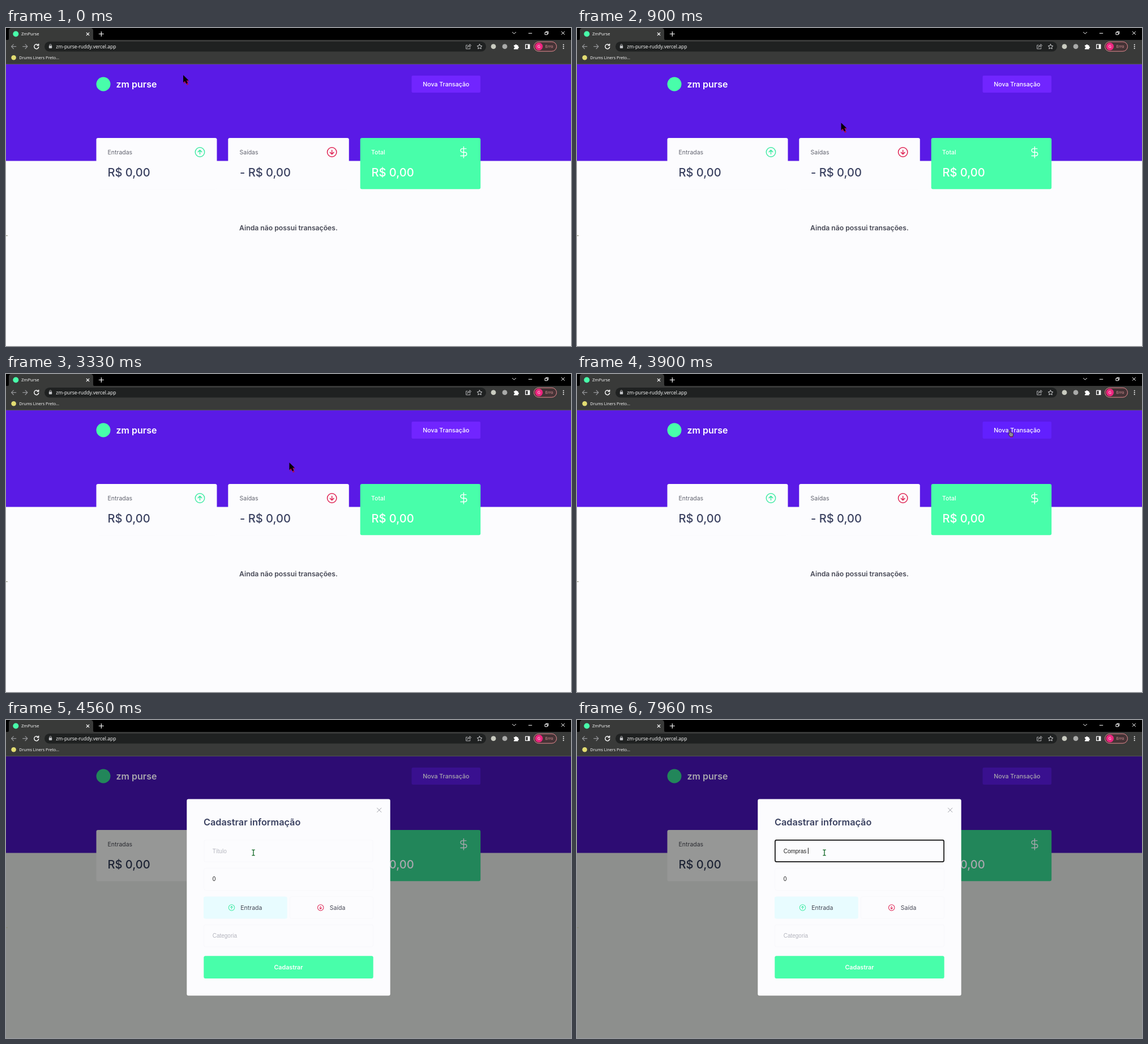
Animation, 998 px wide and 561 px high, one loop 8000 ms. Source, as an HTML page:

```html
<!DOCTYPE html>
<html lang="pt-BR">
<head>
<meta charset="utf-8">
<title>Nova Transação</title>
<style>
  html, body { margin: 0; width: 100%; height: 100%; overflow: hidden; background: #fcfcfe; }
  svg { display: block; width: 100%; height: 100%; }
  text { font-family: Inter, sans-serif; font-size: 10.5px; white-space: pre; }
  .ui text { font-family: "Open Sans", sans-serif; font-weight: 500; fill: #fff; }
  .input { font-family: "Liberation Sans", Arial, sans-serif; font-size: 10px; fill: #222; }
  .hint { fill: #b4b5be; }
  .line { fill: none; stroke-linecap: round; stroke-linejoin: round; }
  .field { fill: #fcfcfe; stroke: #f8f8fb; }
  .focus { fill: #fcfcfe; stroke: #111; stroke-width: 1.7; }
  .medium { font-weight: 500; }
  .bold { font-weight: 600; }
  .heading { font-size: 16.3px; fill: #3a4160; }
  .option { fill: #464855; }
  .white { fill: #fff; }

  /* page colours, plain and behind the dialog */
  #page {
    --back: #fcfcfe; --card: #fcfcfe; --purple: #5a1ae6; --green: #48feaa;
    --button: #7125ff; --hover: #6220fe; --light: #fff; --label: #62646f; --dark: #3a4160;
  }
  #page.dim {
    --back: #8d8f8d; --card: #969796; --purple: #2d0c73; --green: #22865a;
    --button: #39108f; --hover: #340f8a; --light: #a9a7ae; --label: #2b2c32; --dark: #1d2334;
  }
  .back { fill: var(--back); }
  .card { fill: var(--card); }
  .purple { fill: var(--purple); }
  .green { fill: var(--green); }
  .button { fill: var(--button); }
  .button.hover { fill: var(--hover); }
  .light { fill: var(--light); }
  .label { fill: var(--label); }
  .amount { font-size: 20.1px; font-weight: 500; fill: var(--dark); }
  .amount.light { fill: var(--light); }
</style>
</head>
<body>
<svg viewBox="0 0 998 561">
  <defs>
    <g id="up" class="line"><circle r="8.2"/><path d="M0 3.6V-3.6M-3.3-.4 0-3.7 3.3-.4"/></g>
    <g id="down" class="line"><circle r="8.2"/><path d="M0-3.6V3.6M-3.3 .4 0 3.7 3.3 .4"/></g>
  </defs>

  <g id="page">
    <rect class="back" width="998" height="561"/>
    <rect class="purple" y="64" width="998" height="170.5"/>
    <circle class="green" cx="172" cy="99" r="12.5"/>
    <text x="194.5" y="104.5" class="bold light" style="font-size:16px">zm purse</text>
    <rect id="newButton" class="button" x="716.5" y="84" width="121.5" height="30" rx="2"/>
    <text x="777.3" y="103" text-anchor="middle" class="medium light" style="font-size:10.6px">Nova Transação</text>

    <rect class="card" x="159.5" y="194" width="213" height="90.5" rx="3"/>
    <rect class="card" x="392.3" y="194" width="213.5" height="90.5" rx="3"/>
    <rect class="green" x="625.7" y="194" width="212.5" height="90.3" rx="3"/>
    <text x="179.5" y="223" class="label">Entradas</text>
    <text x="412.5" y="223" class="label">Saídas</text>
    <text x="645" y="223" class="medium light">Total</text>
    <text x="179.5" y="261.5" class="amount">R$ 0,00</text>
    <text x="413" y="261.5" class="amount">- R$ 0,00</text>
    <text x="645.5" y="261.5" class="amount light">R$ 0,00</text>
    <use href="#up" x="342.5" y="219" stroke="#42eba5" stroke-width="1.5"/>
    <use href="#down" x="575.7" y="219" stroke="#df2454" stroke-width="1.5"/>
    <path class="line" transform="translate(797.6 208.4) scale(.9)" stroke="var(--light)" stroke-width="1.5"
      d="M12 1v22M17 5H9.5a3.5 3.5 0 0 0 0 7h5a3.5 3.5 0 0 1 0 7H6"/>
    <text x="499" y="357.3" text-anchor="middle" class="bold option" style="font-size:12.2px">Ainda não possui transações.</text>
    <path d="M0 366.3h3" stroke="#85866c"/>
  </g>

  <g id="modal">
    <rect x="319.3" y="139.4" width="359.4" height="346.9" rx="3" fill="#fcfcfe"/>
    <path id="close" class="line" d="M655.5 155.2l7.4 7.4m0-7.4l-7.4 7.4" stroke="#a0a1aa"/>
    <text x="349" y="186" class="bold heading">Cadastrar informação</text>
    <rect id="titleField" x="349.9" y="211.9" width="298.2" height="38.2" rx="2.5"/>
    <text id="titleText" x="364.7" y="234.5" class="input"></text>
    <path id="caret" d="M0 225.5v10.5" stroke="#111"/>
    <rect class="field" x="349.5" y="261.5" width="299" height="39" rx="3"/>
    <text x="364.7" y="284.4" class="input">0</text>
    <rect x="349" y="311.5" width="147.7" height="39" rx="3" fill="#e8fcff"/>
    <rect class="field" x="501.5" y="311.5" width="147" height="39" rx="3"/>
    <use href="#up" transform="translate(398.5 331) scale(.64)" stroke="#42eba5" stroke-width="1.6"/>
    <use href="#down" transform="translate(555.7 331) scale(.64)" stroke="#df2454" stroke-width="1.6"/>
    <text x="414.3" y="334.8" class="option">Entrada</text>
    <text x="571.8" y="334.8" class="option">Saída</text>
    <rect class="field" x="349.5" y="361" width="299" height="39" rx="3"/>
    <text x="364.7" y="384.3" class="input hint">Categoria</text>
    <rect x="349.3" y="416.3" width="299.4" height="39.6" rx="3" fill="#48feaa"/>
    <text x="499" y="440" text-anchor="middle" class="bold white" style="font-size:10.7px">Cadastrar</text>
  </g>

  <g class="ui">
    <rect width="998" height="22" fill="#000"/>
    <rect y="21" width="998" height="43" fill="#393a39"/>
    <path d="M1 22q4 0 4-4V5q0-5 5-5H149q5 0 5 5V18q0 4 4 4z" fill="#393a39"/>
    <path d="M0 63.7H998" stroke="#5c5d5c" stroke-width=".8"/>
    <circle cx="17.3" cy="10.5" r="5" fill="#48feaa"/>
    <text x="27" y="13.3" style="font-size:7.6px">ZmPurse</text>
    <rect x="68" y="24" width="780" height="17.5" rx="8.7" fill="#1f2121"/>
    <g class="line" stroke="#fff" stroke-width="1.2">
      <path d="M142.2 8.3l4.6 4.6m0-4.6l-4.6 4.6M164.3 10.5h8m-4-4v8"/>
      <path d="M894.5 7.3l3 3 3-3M923.2 9.3h5.6M981.2 6.2l5.3 5.3m0-5.3l-5.3 5.3" stroke-width="1"/>
      <path d="M952.3 7.7h4v4h-4zM953.8 7.5V6.2h4v4h-1.3" stroke-width="1"/>
      <path d="M17.7 32.7H9.7m3.6-3.8l-3.8 3.8 3.8 3.8M29.7 32.7h8m-3.6-3.8l3.8 3.8-3.8 3.8" stroke="#96979a"/>
      <path d="M57 30.3a4 4 0 1 0 .7 3.2M57.7 28.2v2.7H55" stroke-width="1.4"/>
      <path d="M76.9 31.5v-1.2a1.6 1.6 0 0 1 3.2 0v1.2" stroke="#c4c5c8" stroke-width=".9"/>
      <path d="M815 30.2h-2.3v6.6h7v-2M815.2 34q.3-3.7 4-3.7v-1.8l2.4 2.5-2.4 2.4v-1.6q-2.5-.1-4 2.2z" stroke="#c4c5c8" stroke-width=".9"/>
      <path d="M836.5 28.6l1.3 2.7 3 .4-2.2 2.1.6 3-2.7-1.5-2.7 1.5.6-3-2.2-2.1 3-.4z" stroke="#e4e5e8" stroke-width=".9"/>
      <path d="M917.6 29.2h7.2v7.2h-7.2z"/>
    </g>
    <rect x="75.8" y="31.3" width="5.4" height="4.4" rx=".7" fill="#c4c5c8"/>
    <text x="88.3" y="35.8" style="font-size:8.5px">zm-purse-ruddy.vercel.app</text>
    <circle cx="861" cy="32.7" r="4.4" fill="#c9cbc0"/>
    <circle cx="881" cy="32.7" r="4.4" fill="#a9aaa9"/>
    <path d="M897 30.2h2.2a1.5 1.5 0 0 1 3 0h2.3v2.4a1.5 1.5 0 0 1 0 3v2h-7.5v-2.2a1.5 1.5 0 0 0 0-3z" fill="#fff"/>
    <path d="M921.7 29.2h3.3v7.3h-3.3z" fill="#fff"/>
    <rect x="932.5" y="24.3" width="40" height="16.8" rx="8.4" fill="#453336" stroke="#e98b92"/>
    <circle cx="941.3" cy="32.6" r="6.8" fill="#ec267f"/>
    <text x="941.3" y="35.2" text-anchor="middle" style="font-size:7px">G</text>
    <text x="952.8" y="35.3" style="font-size:7px;fill:#f0a0a4">Erro</text>
    <g fill="#fff"><circle cx="984.7" cy="29.5" r="1"/><circle cx="984.7" cy="32.8" r="1"/><circle cx="984.7" cy="36.1" r="1"/></g>
    <circle cx="13.6" cy="52.3" r="4.3" fill="#e2dc72"/>
    <text x="23.3" y="55" style="font-size:7.2px">Drums Liners Preto...</text>
  </g>

  <g id="arrow">
    <path d="M1 2v13.5l3-2.6 2.5 5 3-1.4-2.3-4.8h3.4z" fill="#a80c58"/>
    <path d="M0 0v13l3-2.6 2.3 4.8 2.6-1.2-2.2-4.6h4z" fill="#080008"/>
  </g>
  <g id="hand">
    <path d="M2.5 0q1.2 0 1.2 1.2v3l4 1q1.2.3 1 1.8l-.8 4.5H2.8L0 7.3q0-1.3 1.3-.7V1.2Q1.3 0 2.5 0z" fill="#8f8c91" stroke="#25122f" stroke-width=".8"/>
    <path d="M2.8 12.3h5" stroke="#c01070"/>
  </g>
  <path id="beam" class="line" d="M-2.2-4.8h1.5l.7.7.7-.7h1.5M0-4v8M-2.2 4.8h1.5l.7-.7.7.7h1.5" stroke="#0b6420" stroke-width="1.3"/>
</svg>
<script>
const LOOP = 8000, OPEN = 3930, FOCUS = 4600;
const el = id => document.getElementById(id);

// [time, x, y] of the pointer tip
const pointerPath = [
  [30, 313, 83], [360, 490, 141], [620, 524, 168], [830, 470, 168], [1030, 458, 165],
  [3200, 458, 165], [3760, 764, 101], [3900, 762, 99], [3930, 757, 98],
  [4030, 757, 98], [4560, 437, 234]
];

// the title with its mistyped letters
const typing = [
  [5830, 'C'], [5960, 'Co'], [6130, 'Com'], [6300, 'Comp'], [6430, 'Compa'], [6600, 'Compas'],
  [6960, 'Compa'], [7100, 'Comp'], [7300, 'Compr'], [7660, 'Compra'], [7730, 'Compras'], [7930, 'Compras ']
];

function pointerAt(t) {
  const next = pointerPath.findIndex(p => p[0] > t);
  if (next === 0) return pointerPath[0].slice(1);
  if (next < 0) return pointerPath.at(-1).slice(1);
  const [t0, x0, y0] = pointerPath[next - 1], [t1, x1, y1] = pointerPath[next];
  const k = (t - t0) / (t1 - t0), ease = k * k * (3 - 2 * k);
  return [x0 + (x1 - x0) * ease, y0 + (y1 - y0) * ease];
}

const show = (id, on) => el(id).setAttribute('visibility', on ? 'visible' : 'hidden');

function drawPointer(t) {
  const [x, y] = pointerAt(t);
  const overButton = t < OPEN && x > 717 && y < 114;
  const overField = t > OPEN && x < 649 && y > 211;
  const active = overButton ? 'hand' : overField ? 'beam' : 'arrow';
  for (const id of ['arrow', 'hand', 'beam']) {
    show(id, id === active);
    el(id).setAttribute('transform', `translate(${x} ${y})`);
  }
  el('newButton').classList.toggle('hover', overButton || (t >= OPEN && t < 4100));
}

function drawTitle(t) {
  const [typedAt, value] = typing.findLast(k => k[0] <= t) || [FOCUS, ''];
  const title = el('titleText'), focused = t >= FOCUS;
  title.textContent = value || 'Título';
  title.classList.toggle('hint', !value);
  el('titleField').setAttribute('class', focused ? 'focus' : 'field');
  show('caret', focused && (t - typedAt) % 1000 < 500);
  const width = value ? title.getComputedTextLength() : 0;
  el('caret').setAttribute('transform', `translate(${365 + width} 0)`);
}

function draw(t) {
  const open = t >= OPEN;
  el('page').classList.toggle('dim', open);
  el('modal').style.display = open ? '' : 'none';
  if (open) {
    el('close').style.display = t >= 4200 ? '' : 'none';
    drawTitle(t);
  }
  drawPointer(t);
}

const start = performance.now();
function frame() {
  draw((performance.now() - start) % LOOP);
  requestAnimationFrame(frame);
}
frame();
</script>
</body>
</html>
```
